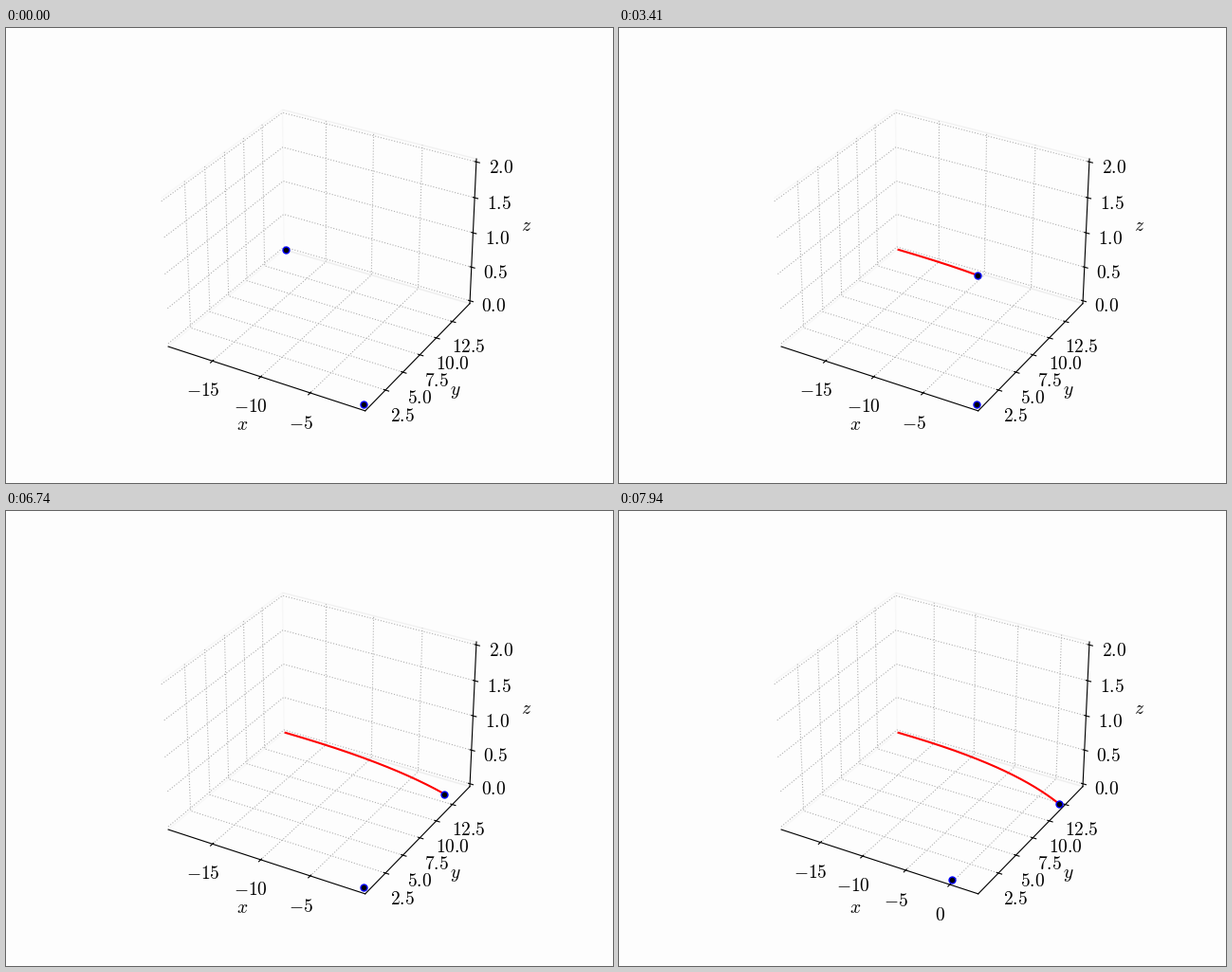
Recreate the animation shown at these times as a matplotlib script. Size 640x480 px, loop 8000 ms.

```python
import numpy as np
import matplotlib.pyplot as plt
from matplotlib.animation import FuncAnimation

LOOP, TICK = 8000, 40       # ms
GM = 40.0                   # pull of the fixed body at the origin
START, SPEED = (-19.3, 15.0), 2.53

plt.rcParams.update({
    "mathtext.fontset": "cm",
    "font.size": 14,
    "axes.labelsize": 14,
    "xtick.labelsize": 14,
    "ytick.labelsize": 14,
    "grid.linestyle": ":",
    "grid.linewidth": 0.8,
    "axes.linewidth": 0.8,
})


def orbit(dt=0.01):
    """Leapfrog path of the moving body, one point per 10 ms."""
    pos, vel = np.array(START), np.array([SPEED, 0.0])
    points = []
    for _ in range(LOOP // 10 + 1):
        points.append(pos)
        mid = pos + vel * dt / 2
        vel = vel - GM * mid / np.hypot(*mid) ** 3 * dt
        pos = mid + vel * dt / 2
    return np.array(points)


def padded(lo, hi):
    pad = (hi - lo) / 48
    return lo - pad, hi + pad


path = orbit()

# The picture advances in steps that get shorter as the body speeds up.
knot_step = [0, 3, 5, 7, 10, 14, 16, 20, 22, 28, 29, 35, 37, 45]
knot_time = [0, 840, 1380, 1880, 2570, 3410, 3800, 4520, 4860, 5800, 5940,
             6740, 7000, 7940]
steps = np.interp(np.arange(46), knot_step, knot_time)

fig = plt.figure(figsize=(6.4, 4.8), dpi=100, facecolor="#fdfdfd")
ax = fig.add_subplot(projection="3d", facecolor="#fdfdfd")

for axis in (ax.xaxis, ax.yaxis, ax.zaxis):
    axis.pane.fill = False
    axis.set_major_formatter(lambda v, _: f"${v:.1f}$")
ax.xaxis.set_major_formatter(lambda v, _: f"${v:.0f}$")

ax.set(xlabel="$x$", ylabel="$y$", zlabel="$z$")
ax.set_yticks(np.arange(2.5, 13, 2.5))
ax.set_zticks(np.arange(0, 2.1, 0.5))
ax.set_ylim(*padded(0, 15))
ax.set_zlim(*padded(0, 2))

dot = dict(marker="o", ls="", ms=5, mfc="black", mec="blue", mew=1)
trail, = ax.plot([], [], [], color="red", lw=1.5)
ax.plot([0], [0], [0], **dot)
body, = ax.plot([], [], [], **dot)


def draw(frame):
    now = frame * TICK + TICK / 2
    time = steps[steps <= now][-1]
    seen = path[:int(round(time / 10)) + 1]
    x, y = seen.T
    trail.set_data_3d(x, y, np.zeros_like(x))
    body.set_data_3d(x[-1:], y[-1:], [0])
    right = max(0, x[-1])
    ax.set_xticks([-15, -10, -5] + [0] * (right > 0))
    ax.set_xlim(*padded(START[0], right))
    return trail, body


anim = FuncAnimation(fig, draw, frames=LOOP // TICK, interval=TICK,
                     init_func=lambda: draw(0), repeat=True, repeat_delay=0)
plt.show()
```
